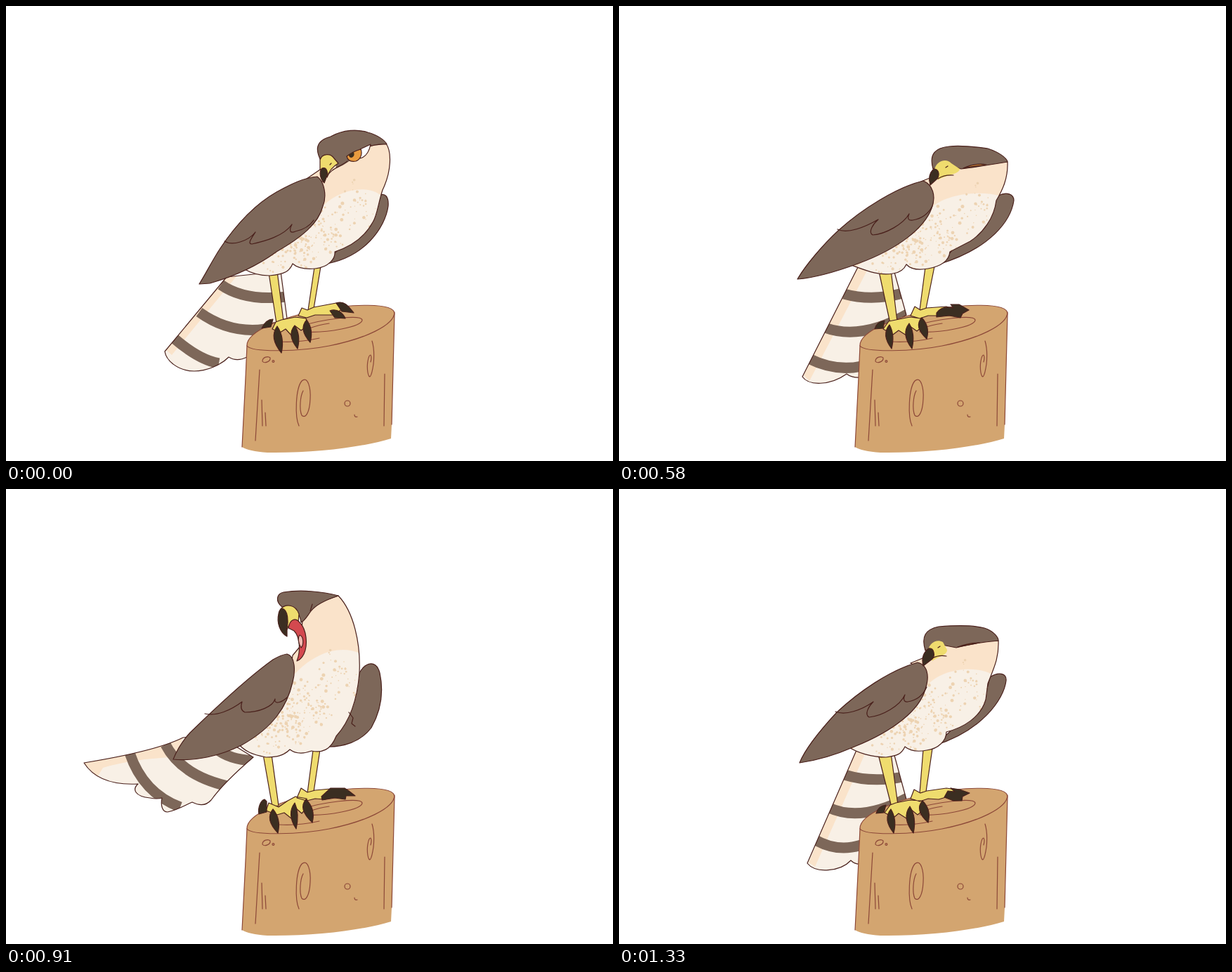
These frames come from a looping animation (864x648 px, 1580 ms). An HTML page:

```html
<!DOCTYPE html>
<html lang="en">
<head>
<meta charset="utf-8">
<title>Hawk on a stump</title>
<style>
  html, body { margin: 0; width: 100%; height: 100%; overflow: hidden; background: #fff; }
  svg { display: block; width: 864px; height: 648px; }
  path { fill: none; stroke-width: 1.2; stroke-linejoin: round; stroke-linecap: round; }
  .line { stroke: #4a211c; }
  .brown { fill: #7d6759; }
  .cream { fill: #f8f0e6; }
  .peach { fill: #fae3ca; }
  .yellow { fill: #efdc6e; }
  .dark { fill: #3b2e21; }
  .orange { fill: #e99b3f; }
  .white { fill: #fff; }
  .red { fill: #d3494f; }
  .pink { fill: #f2b9b0; }
  .wood { fill: #d3a570; }
  .grain { stroke: #8c4838; }
  .stripe { stroke: #7d6759; stroke-width: 15; stroke-linecap: butt; }
</style>
</head>
<body>
<svg id="stage" viewBox="0 0 864 648"></svg>
<script>
const LOOP = 1580;

const stump = [
  ['wood', 'M343 484C342 462 400 442 440 434C490 424 553 422 553 438L549 596 548 616C510 628 440 637 372 636Q345 634 336 628Z'],
  ['grain', 'M549 596L553 438C553 422 490 424 440 434C400 442 342 462 343 484L341 530 336 628'],
  ['grain', 'M343 484C350 494 420 492 460 484C510 474 553 455 553 436'],
  ['grain', 'M420 456C450 446 505 439 507 447C507 457 455 466 428 464M432 459Q445 454 460 452M388 478Q415 480 446 473'],
  ['grain', 'M361 518L355 619M364 561L365 598M369 579L370 598M539 524L538 598'],
  ['grain', 'M365 506C365 500 373 498 376 501C377 506 368 510 365 506M379 506a1.4 1.4 0 1 0 2.8 0a1.4 1.4 0 1 0 -2.8 0'],
  ['grain', 'M417 598C411 585 412 545 421 534C430 526 434 545 433 560C432 580 426 588 421 583C417 574 419 555 423 548'],
  ['grain', 'M521 477Q525 490 523 510C520 530 517 532 515 522C513 510 516 497 519 497Q521 500 519 507'],
  ['grain', 'M482 566a4 4 0 1 0 8 0a4 4 0 1 0 -8 0M496 582Q496 586 500 585']
];

// claws: [base x, base y, tip x, tip y]; spots: [start x, start y, end x, end y]
const poses = [
  {
    start: 0,
    farWing: 'M530 270C540 265 545 272 544 285C540 315 510 360 450 368L525 300Z',
    tail: 'M314 386L226 492C228 505 245 520 268 520C285 520 305 512 317 500C325 505 335 504 343 500L400 445 391 378Z',
    tailEdge: 'M310 386L228 490 236 497 328 385Z',
    stripes: 'M306 397Q340 421 400 414M275 436Q325 472 385 457M240 474Q275 504 303 509',
    legs: 'M374 380L386 378 395 449 385 452ZM439 372L448 371 438 431 430 433Z',
    feet: 'M379 460L384 450 392 447 412 443 427 445 430 455 420 462 412 456 407 470 398 460 390 465ZM416 441L421 430 429 433 438 429 470 423 478 432 465 440 440 440 428 444Z',
    claws: [[386, 456, 392, 494], [411, 455, 415, 488], [428, 447, 433, 479]],
    talons: 'M364 459Q370 446 380 446L377 457ZM470 423C482 419 488 428 495 437L478 435ZM461 434C472 430 480 438 483 445L468 444Z',
    body: 'M428 246L447 233 470 200 541 196C549 207 549 235 536 262C530 280 528 300 522 308C510 330 490 343 468 350C469 359 460 372 440 374Q418 376 408 367C404 377 398 382 375 384C360 384 348 380 338 374L420 310 450 250Z',
    chest: 'M420 310L453 283C475 262 515 253 535 271L540 400 300 400Z',
    spots: [515, 272, 368, 370],
    wing: 'M443 243C453 250 457 270 451 285C445 310 420 330 385 350C355 372 325 385 290 395L275 396C285 380 295 360 305 345C325 315 350 285 385 265C405 254 425 244 443 243Z',
    feathers: 'M311 335C322 342 345 335 355 322C350 330 343 339 350 339C368 335 395 328 407 311C402 321 405 324 412 321Q430 317 438 305',
    head: [
      ['brown line', 'M449 222C440 205 440 192 462 186C480 176 500 175 515 180C530 184 540 192 542 197C530 196 515 200 505 204C492 209 484 215 472 223Z'],
      ['brown', 'M468 218L507 203Q490 224 470 231Z'],
      ['white line', 'M504 204L519 197C517 207 512 215 504 217Z'],
      ['orange line', 'M485 214Q494 207 505 204C508 211 504 219 498 221Q487 223 485 214Z'],
      ['dark', 'M488 212L495 208Q497 214 492 216Q488 216 488 212Z'],
      ['yellow line', 'M447 219C450 210 462 209 467 217L473 224C466 228 460 234 457 244L447 232Z'],
      ['dark line', 'M450 231C457 229 459 238 456 244L453 252C447 246 445 236 450 231Z'],
      ['line', 'M457 243C462 232 474 230 486 221M461 226L463 224']
    ]
  },
  {
    start: 580,
    farWing: 'M540 270C552 264 562 268 562 277C558 305 530 345 455 368L530 290Z',
    tail: 'M340 372L261 528C270 541 300 541 324 524Q332 530 345 529L345 480 409 440 390 372Z',
    tailEdge: 'M338 372L263 526 271 534 354 375Z',
    stripes: 'M320 410Q360 421 404 409M293 458Q345 477 412 438M270 502Q308 521 345 513',
    legs: 'M370 378L387 376 396 449 386 452ZM436 372L449 371 437 431 428 433Z',
    feet: 'M376 460L384 449 394 447 414 443 430 445 434 455 424 463 414 456 409 469 398 462 390 468ZM415 441L421 428 429 433 438 430 466 428 476 432 462 441 440 441 428 445Z',
    claws: [[385, 454, 388, 488], [413, 452, 417, 488], [431, 444, 438, 474]],
    talons: 'M364 460Q367 449 378 448L376 459ZM452 437C459 428 468 428 476 430L472 425 484 425 498 433 489 438 486 444 470 441 452 443Z',
    body: 'M430 250L447 243 460 218 553 222C554 245 546 262 537 277C534 302 518 323 500 335L471 350C470 360 462 370 440 374Q418 378 409 368C405 377 398 380 390 381C370 385 350 376 328 368L420 300 445 265Z',
    chest: 'M420 310L446 286C468 267 515 262 545 271L540 400 300 400Z',
    spots: [528, 278, 362, 371],
    wing: 'M433 249C446 254 452 270 445 288C435 315 400 345 340 367C310 378 280 387 254 389C265 370 290 340 313 319C345 290 395 258 433 249Z',
    feathers: 'M311 318C325 325 350 315 369 304C362 310 354 322 361 326C380 325 405 310 413 296C410 303 412 306 418 305Q437 302 446 285',
    head: [
      ['brown line', 'M447 232C441 211 450 202 470 200C490 198 510 201 525 203C540 208 552 216 553 222C535 225 505 230 487 232L465 226Z'],
      ['orange line', 'M490 231Q508 223 523 226Q505 228 490 231Z'],
      ['yellow', 'M449 234C450 222 465 215 473 224L485 232C484 240 466 240 454 248Z'],
      ['dark line', 'M447 233C455 230 457 240 453 246L443 255C440 245 442 238 447 233Z'],
      ['line', 'M454 246Q463 240 476 241M465 230L468 228']
    ]
  },
  {
    start: 910,
    farWing: 'M503 262C512 246 527 243 532 262C538 290 534 315 520 340C505 360 480 368 455 367L490 320Z',
    tail: 'M252 354C220 370 160 382 111 390C125 412 150 422 188 420C179 428 184 438 205 440Q215 442 222 440C220 450 222 460 230 460C245 457 255 450 265 446C275 451 285 451 292 443C305 425 325 405 352 382L300 350Z',
    tailEdge: 'M111 390L252 354 242 382C200 383 165 389 138 397L130 410Z',
    stripes: 'M176 376Q195 433 248 453M227 364Q250 408 315 423M298 369Q318 386 354 387',
    legs: 'M366 378L378 378 388 451 379 452ZM437 372L447 371 438 431 429 433Z',
    feet: 'M370 458L374 447 388 453 401 444 412 438 428 441 430 452 421 462 413 455 406 469 396 461 386 464ZM414 440L420 426 429 432 440 429 462 427 470 436 454 442 440 441 428 444Z',
    claws: [[380, 456, 387, 490], [411, 447, 413, 484], [427, 442, 436, 475]],
    talons: 'M360 463C358 453 363 443 368 442L371 445 371 460ZM449 438L462 426 482 426 488 430 497 437 484 437 483 442 468 440 450 443Z',
    body: 'M473 152C495 175 505 220 503 262C500 300 490 330 470 352C462 372 450 376 435 373Q416 380 404 371C395 380 385 382 370 382C350 378 340 374 330 362L400 290 408 237 418 225 422 188 436 165Z',
    chest: 'M405 270C430 240 470 218 506 235L540 400 300 400Z',
    spots: [485, 250, 362, 370],
    wing: 'M400 235C412 238 412 260 408 275C400 310 380 340 335 365C305 380 270 388 238 385C242 375 250 360 262 347C300 310 345 268 380 243Q392 236 400 235Z',
    feathers: 'M283 320C300 324 320 315 336 303C333 312 335 316 340 318C360 318 380 310 383 299C381 306 390 306 400 297M488 318L494 326 492 334 497 338',
    head: [
      ['brown line', 'M393 168C383 160 385 149 395 147C420 143 450 146 473 152C455 158 440 166 434 174C428 182 425 188 420 190C418 175 410 168 393 168Z'],
      ['line', 'M433 174L436 164'],
      ['yellow line', 'M391 171C398 163 412 164 417 178L416 190C408 186 403 192 400 200Z'],
      ['dark line', 'M393 170C402 172 402 190 400 198L400 210C390 205 385 190 388 178Q389 171 393 170Z'],
      ['red line', 'M402 198C404 185 412 183 418 190C428 200 430 222 424 235Q420 243 414 245C420 230 418 210 410 202Z'],
      ['pink line', 'M418 208C424 210 424 222 420 226C416 220 415 212 418 208Z']
    ]
  },
  {
    start: 1330,
    farWing: 'M528 268C540 260 552 262 551 273C548 300 515 345 450 365L520 300Z',
    tail: 'M338 372L268 533C280 548 315 545 330 529Q336 535 345 534L345 480 409 442 390 372Z',
    tailEdge: 'M336 372L270 532 279 538 351 375Z',
    stripes: 'M321 407Q360 419 404 410M299 454Q345 475 412 439M278 499Q310 518 345 507',
    legs: 'M369 378L387 376 397 450 388 453ZM433 371L446 370 437 431 428 433Z',
    feet: 'M378 461L386 450 394 447 414 443 431 444 436 455 425 464 415 456 409 469 398 462 391 468ZM415 441L420 428 429 433 438 430 466 426 480 428 472 437 455 442 440 441 428 445Z',
    claws: [[387, 456, 391, 490], [414, 452, 419, 490], [432, 444, 440, 475]],
    talons: 'M366 462Q369 451 380 450L377 461ZM463 439L468 430 478 431 472 426 485 428 499 433 489 438 488 444 476 444Z',
    body: 'M415 248L432 241 445 218 540 216C541 240 534 254 525 277L522 300C515 325 490 340 466 346C466 358 455 370 438 372Q418 376 407 367C402 378 395 380 380 382C360 382 340 376 326 367L420 290 436 260Z',
    chest: 'M410 300L438 281C455 258 505 248 535 266L540 400 300 400Z',
    spots: [512, 268, 362, 369],
    wing: 'M425 247C438 250 443 265 436 285C428 315 390 345 335 367C310 378 285 386 257 390C265 370 285 345 310 318C340 290 385 258 425 247Z',
    feathers: 'M308 317C322 323 345 315 362 303C355 310 349 321 356 325C375 323 400 309 407 293C404 300 406 304 411 303Q430 300 438 282',
    head: [
      ['brown line', 'M436 230C430 210 436 200 455 196C480 194 505 194 520 198C535 203 540 212 540 216C515 218 495 222 480 226L460 222Z'],
      ['orange line', 'M482 225Q498 219 513 219Q498 222 482 225Z'],
      ['yellow', 'M440 230C442 219 452 213 461 218L467 229C467 237 455 238 446 245Z'],
      ['dark line', 'M441 227C449 226 450 238 446 242L433 252C430 240 434 232 441 227Z'],
      ['line', 'M446 241Q455 236 466 238M454 226L457 224']
    ]
  }
];

const path = (cls, d) => `<path class="${cls}" d="${d}"/>`;
const paths = list => list.map(([cls, d]) => path(cls, d)).join('');
const clip = (id, d) => `<clipPath id="${id}"><path d="${d}"/></clipPath>`;
const clipped = (id, content) => `<g clip-path="url(#${id})">${content}</g>`;

function claw([x, y, tipX, tipY]) {
  const middle = y + (tipY - y) * 0.42;
  return path('dark line', `M${x} ${y}Q${x - 12} ${middle} ${tipX} ${tipY}Q${tipX + 5} ${middle} ${x} ${y}Z`);
}

// Speckles scattered along the diagonal of the chest, densest near its middle.
function speckles([x0, y0, x1, y1]) {
  let seed = 7;
  const random = () => (seed = seed * 16807 % 2147483647) / 2147483647;
  const dx = x1 - x0, dy = y1 - y0, length = Math.hypot(dx, dy);
  let dots = '';
  for (let i = 0; i < 260; i++) {
    const along = i % 3 ? random() : 0.35 + random() * 0.4;
    const across = (random() + random() - 1) * 42;
    const x = x0 + dx * along - dy / length * across;
    const y = y0 + dy * along + dx / length * across;
    const radius = 0.7 + random() ** 2 * 1.8;
    dots += `<circle cx="${x.toFixed(1)}" cy="${y.toFixed(1)}" r="${radius.toFixed(1)}"/>`;
  }
  return `<g fill="#edd3b2">${dots}</g>`;
}

function drawPose(pose, i) {
  return `<g class="pose">
    ${clip('tail' + i, pose.tail)}${clip('body' + i, pose.body)}
    ${path('brown line', pose.farWing)}
    ${path('cream', pose.tail)}
    ${clipped('tail' + i, path('peach', pose.tailEdge) + path('stripe', pose.stripes))}
    ${path('line', pose.tail)}
    ${paths(stump)}
    ${path('yellow line', pose.legs)}${path('yellow line', pose.feet)}
    ${path('dark line', pose.talons)}${pose.claws.map(claw).join('')}
    ${path('peach', pose.body)}
    ${clipped('body' + i, path('cream', pose.chest) + speckles(pose.spots))}
    ${path('line', pose.body)}
    ${path('brown line', pose.wing)}${path('line', pose.feathers)}
    ${paths(pose.head)}
  </g>`;
}

const stage = document.getElementById('stage');
stage.innerHTML = poses.map(drawPose).join('');
const groups = [...stage.querySelectorAll('.pose')];
const origin = performance.now();

function render() {
  const time = (performance.now() - origin) % LOOP;
  const current = poses.findLastIndex(pose => time >= pose.start);
  groups.forEach((group, i) => group.style.display = i === current ? '' : 'none');
  requestAnimationFrame(render);
}
render();
</script>
</body>
</html>
```
